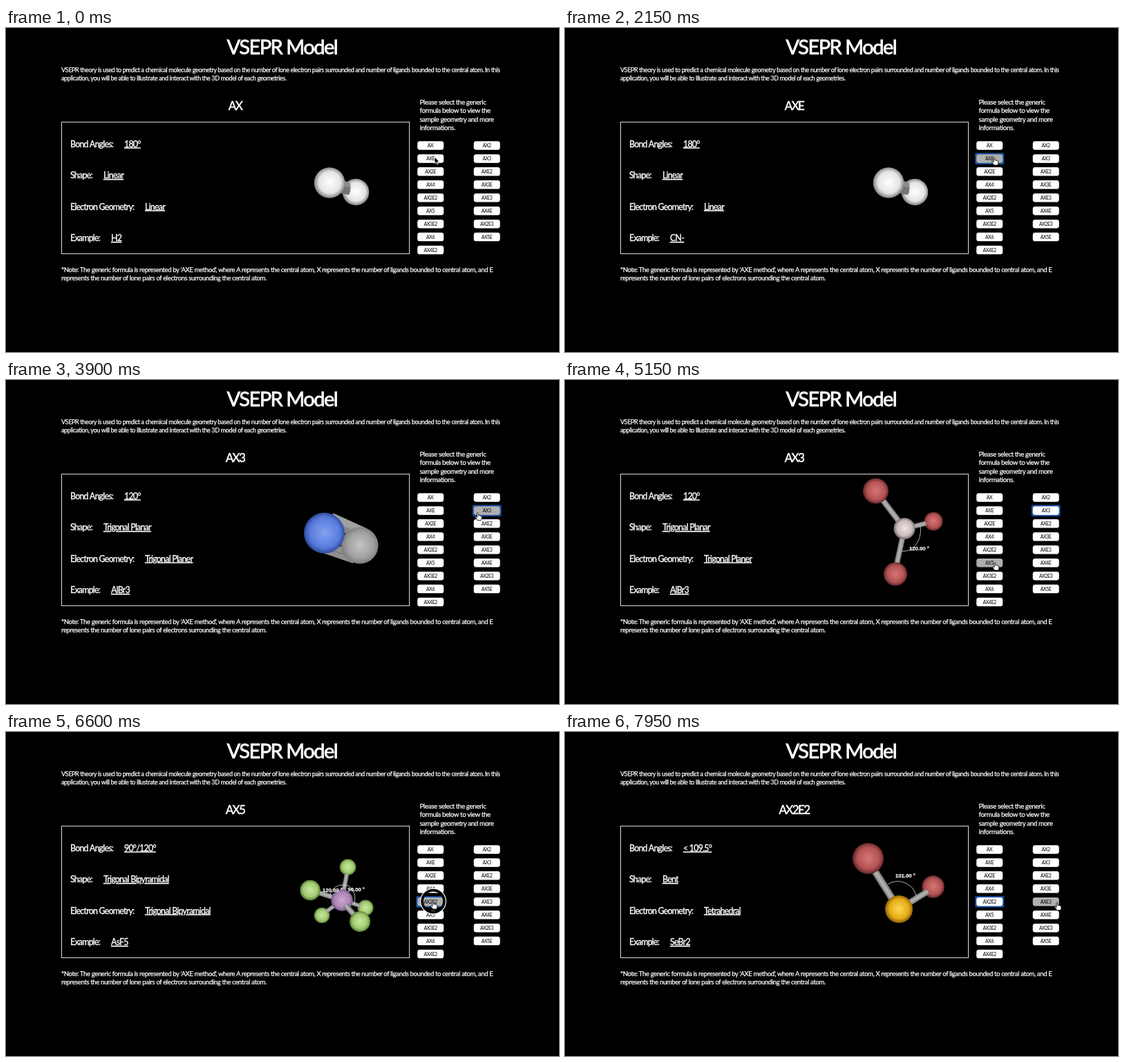
Recreate the animation shown at these times as an HTML page. Size 800 by 470 pixels, loop 8000 ms.

```html
<!DOCTYPE html>
<html lang="en">
<head>
<meta charset="utf-8">
<title>VSEPR Model</title>
<style>
html, body { margin: 0; width: 100%; height: 100%; overflow: hidden; background: #000; }
svg { display: block; width: 800px; height: 470px; background: #000; }
text { font-family: Lato, "Open Sans", sans-serif; fill: #fff; stroke: #fff; stroke-width: .25px; white-space: pre; }
.title { font-size: 29px; letter-spacing: -1.5px; stroke-width: .8px; text-anchor: middle; }
.head { font-size: 17px; letter-spacing: -1.6px; stroke-width: .5px; text-anchor: middle; }
.intro { font-size: 9.1px; letter-spacing: -.045em; }
.note { font-size: 9.6px; letter-spacing: -.0417em; }
.side { font-size: 9.8px; letter-spacing: -.04em; }
.row { font-size: 12.4px; letter-spacing: -.75px; stroke-width: .35px; }
.value { text-decoration: underline; text-decoration-thickness: 1px; text-underline-offset: 1.5px; }
.btn { font-size: 7px; letter-spacing: -.45px; text-anchor: middle; fill: #000; stroke: none; }
.angle { font: bold 7.7px "Liberation Sans", sans-serif; }
</style>
</head>
<body>
<svg id="stage" viewBox="0 0 800 470"></svg>
<script>
const NS = "http://www.w3.org/2000/svg";
const LOOP = 8000;
const stage = document.getElementById("stage");

function el(tag, attrs = {}, parent = stage, text) {
  const node = document.createElementNS(NS, tag);
  for (const key in attrs) node.setAttribute(key, attrs[key]);
  if (text !== undefined) node.textContent = text;
  parent.appendChild(node);
  return node;
}
const write = (cls, x, y, text, parent) => el("text", { class: cls, x, y }, parent, text);
const show = (node, on) => node.setAttribute("visibility", on ? "visible" : "hidden");

// Sphere materials: centre, middle and rim colours
const materials = {
  white: ["#ffffff", "#e4e4e4", "#777777"],
  grey: ["#c4c4c4", "#a0a0a0", "#7c7c7c"],
  blue: ["#7d9df0", "#5378dc", "#2c479c"],
  red: ["#d67474", "#b25052", "#5c2426"],
  pale: ["#eee2e2", "#cabcbd", "#716566"],
  green: ["#c8e8a0", "#a0ca70", "#54752f"],
  violet: ["#d2b6dc", "#ab8fba", "#6a5478"],
  gold: ["#ffd850", "#e4aa16", "#835a08"]
};
const defs = el("defs");
for (const name in materials) {
  const grad = el("radialGradient", { id: name, cx: .51, cy: .49, r: .52 }, defs);
  materials[name].forEach((color, i) =>
    el("stop", { offset: [0, .68, 1][i], "stop-color": color }, grad));
}
function dots(id, size, color, radius) {
  const tile = el("pattern", {
    id, width: size, height: size, patternUnits: "userSpaceOnUse", patternTransform: "rotate(24)"
  }, defs);
  el("circle", { cx: size / 2, cy: size / 2, r: radius, fill: color }, tile);
}
dots("mesh", 2.4, "#fff", .5);
dots("pink", 3.2, "#f07ad8", .8);
dots("dark", 2.7, "#3a2848", .6);

function ball(g, x, y, r, material, pattern, opacity = .3) {
  el("circle", { cx: x, cy: y, r, fill: `url(#${material})` }, g);
  if (pattern) el("circle", { cx: x, cy: y, r: r * .87, fill: `url(#${pattern})`, opacity }, g);
}
function bond(g, x1, y1, x2, y2, w) {
  [["#757575", 1], ["#999", .7], ["#b0b0b0", .35]].forEach(([stroke, k]) =>
    el("line", { x1, y1, x2, y2, stroke, "stroke-width": w * k }, g));
}
const shape = (g, d, fill) => el("path", { d, fill }, g);
const arc = (g, d) => el("path", { d, fill: "none", stroke: "#ddd", "stroke-width": .8 }, g);

const builders = {
  AX(g) {
    ball(g, 506, 238, 19.3, "white");
    shape(g, "M486 220L498 225Q500 233 496 242L482 239Z", "#8c8c8c");
    shape(g, "M488 229L498 232Q498 238 496 242L482 239Z", "#747474");
    ball(g, 468, 224.5, 22.3, "white");
  },
  AXE(g) {
    shape(g, "M473 193L521 215L502 266L453 249Z", "#888");
    shape(g, "M475 194L523 216L516 224L478 207Z", "#a0a0a0");
    shape(g, "M484 220L499 224L492 242L478 244Z", "#3c3c3c");
    shape(g, "M486 227L505 228L496 240L480 238Z", "#858585");
    shape(g, "M464 245L494 240L504 265L456 250Z", "#8e8e8e");
    arc(g, "M472 247L497 256").setAttribute("stroke", "#666");
    ball(g, 512, 240, 26.5, "grey");
    ball(g, 460.5, 222, 29.5, "blue", "mesh", .35);
  },
  AX3(g) {
    ball(g, 533, 205, 13.5, "red", "mesh", .12);
    bond(g, 491, 215.5, 522, 208, 7);
    bond(g, 491, 215.5, 480, 267, 8);
    bond(g, 491, 215.5, 458, 172, 8.5);
    ball(g, 491, 215.5, 15.5, "pale");
    ball(g, 478, 281.5, 17, "red", "mesh", .12);
    ball(g, 449.5, 161, 18.5, "red", "mesh", .12);
    arc(g, "M487 248C502 251 517 234 514 212");
    write("angle", 498, 247, "120.00 °", g);
  },
  AX5(g) {
    ball(g, 494.5, 196, 11.8, "green");
    ball(g, 520, 255, 11.5, "green");
    ball(g, 457, 266, 11.3, "green");
    bond(g, 486, 244, 493, 206, 6.5);
    bond(g, 486, 244, 512, 252, 6);
    bond(g, 486, 244, 464, 260, 6);
    bond(g, 486, 244, 452, 233, 7.5);
    ball(g, 486, 244, 15.7, "violet", "pink", .75);
    el("circle", { cx: 486, cy: 244, r: 14.5, fill: "url(#dark)", opacity: .4 }, g);
    bond(g, 491, 251, 506, 268, 8);
    ball(g, 440, 229.5, 14.7, "green");
    ball(g, 512, 275, 15, "green");
    arc(g, "M468 238C471 226 480 221 490 222M490 222C500 222 507 234 504 249");
    write("angle", 458, 232, "120.00 °", g);
    write("angle", 494.5, 230.5, "90.00 °", g);
  },
  AX2E2(g) {
    ball(g, 532.5, 224.5, 16.3, "red", "mesh", .12);
    bond(g, 483, 257, 525, 231, 9);
    bond(g, 483, 257, 449, 203, 10.5);
    ball(g, 483, 257, 20, "gold", "mesh", .08);
    ball(g, 438.5, 183.5, 22.5, "red", "mesh", .12);
    arc(g, "M467 221C482 211 504 219 508 238");
    write("angle", 478, 211, "101.00 °", g);
  }
};

// Fixed page text
write("title", 399.3, 38, "VSEPR Model");
write("intro", 80, 64, "VSEPR theory is used to predict a chemical molecule geometry based on the number of lone electron pairs surrounded and number of ligands bounded to the central atom. In this");
write("intro", 80, 76, "application, you will be able to illustrate and interact with the 3D model of each geometries.");
write("note", 80, 353.5, "*Note: The generic formula is represented by 'AXE method', where A represents the central atom, X represents the number of ligands bounded to central atom, and E");
write("note", 80, 366, "represents the number of lone pairs of electrons surrounding the central atom.");
["Please select the generic", "formula below to view the", "sample geometry and more", "informations."]
  .forEach((line, i) => write("side", 598.5, 110.5 + i * 12.6, line));
el("rect", { x: 80.5, y: 136.5, width: 503, height: 191, fill: "none", stroke: "#dcdcdc" });

const rowY = i => 172.5 + i * 45.5;
["Bond Angles:", "Shape:", "Electron Geometry:", "Example:"]
  .forEach((label, i) => write("row", 93, rowY(i), label));
const heading = write("head", 331.5, 119, "");
const values = [171, 141, 201, 152].map((x, i) => write("row value", x, rowY(i), ""));

const info = {
  AX: ["180°", "Linear", "Linear", "H2"],
  AXE: ["180°", "Linear", "Linear", "CN-"],
  AX3: ["120°", "Trigonal Planar", "Trigonal Planer", "AlBr3"],
  AX5: ["90°/120°", "Trigonal Bipyramidal", "Trigonal Bipyramidal", "AsF5"],
  AX2E2: ["< 109.5°", "Bent", "Tetrahedral", "SeBr2"]
};

const models = {};
for (const name in builders) {
  models[name] = el("g");
  builders[name](models[name]);
}

// Formula buttons
const buttons = [];
function addColumn(x, names) {
  names.forEach((name, i) => {
    const y = 164.2 + i * 18.95;
    const ring = el("rect", { x: x - 2, y: y - 2, width: 42, height: 16.5, rx: 1.8, fill: "#184f9e" });
    const face = el("rect", { x, y, width: 38, height: 12.5, rx: 3.4, fill: "#fff" });
    write("btn", x + 18.8, y + 8.8, name);
    buttons.push({ name, x, y, ring, face });
  });
}
addColumn(595.2, ["AX", "AXE", "AX2E", "AX4", "AX2E2", "AX5", "AX3E2", "AX6", "AX4E2"]);
addColumn(676.7, ["AX2", "AX3", "AXE2", "AX3E", "AXE3", "AX4E", "AX2E3", "AX5E"]);

// Click ripple and pointer
const ripple = el("g", { fill: "none" });
const rippleRings = [["#000", 4, -2], ["#e8e8e8", 1.3, .4]].map(([stroke, w, grow]) =>
  ({ grow, node: el("circle", { stroke, "stroke-width": w }, ripple) }));
const pointer = el("g");
const arrow = el("path", {
  d: "M0 0V9.6L2.2 7.6L3.7 11L5.3 10.3L3.8 7H6.8Z",
  fill: "#000", stroke: "#fff", "stroke-width": .75
}, pointer);
const hand = el("path", {
  d: "M0 .8C0-.4 1.8-.4 1.8 .8V4.2C2.2 3.5 3.4 3.6 3.6 4.4C4.2 3.8 5.2 4 5.3 4.9C6 4.5 6.8 4.8 6.8 5.7V8Q6.6 9.5 5.8 11H.5C-.2 9.3-1.6 8-2.6 6.6C-3 5.7-2 5.2-1.3 5.8L0 7Z",
  fill: "#fff", stroke: "#000", "stroke-width": .8
}, pointer);

// Each selection: press time and time its model appears
const picks = [
  { name: "AX", press: -1000, load: -500 },
  { name: "AXE", press: 1750, load: 2500 },
  { name: "AX3", press: 3600, load: 4500 },
  { name: "AX5", press: 5450, load: 6250 },
  { name: "AX2E2", press: 6550, load: 7350 }
];
const route = [
  [0, 620, 187], [2520, 620, 188], [2900, 674, 198], [3280, 681.5, 192.5],
  [4350, 681.5, 192.5], [5050, 621, 265], [5650, 621, 265], [6300, 617, 246],
  [6850, 617, 246], [7450, 711, 247.5], [LOOP, 711, 247.5]
];
function position(t) {
  let i = 0;
  while (i < route.length - 2 && t >= route[i + 1][0]) i++;
  const [t0, x0, y0] = route[i], [t1, x1, y1] = route[i + 1];
  const u = (t - t0) / (t1 - t0), k = u * u * (3 - 2 * u);
  return [x0 + (x1 - x0) * k, y0 + (y1 - y0) * k];
}
const latest = test => picks.filter(test).pop();

function draw(t) {
  const pressed = latest(p => t >= p.press);
  const named = latest(p => t >= p.press + 100).name;
  const loaded = latest(p => t >= p.load).name;

  heading.textContent = named;
  values.forEach((node, i) => { node.textContent = info[named][i]; });
  for (const name in models) show(models[name], name === loaded);

  const [x, y] = position(t);
  let over = false;
  for (const b of buttons) {
    const hover = t >= 100 && x >= b.x && x <= b.x + 38 && y >= b.y && y <= b.y + 12.5;
    over = over || hover;
    b.face.setAttribute("fill", hover ? "#afafaf" : "#fff");
    show(b.ring, pressed.press > 0 && b.name === pressed.name);
  }

  const age = t - pressed.press;
  show(ripple, age < 200);
  if (age < 200) {
    for (const { node, grow } of rippleRings) {
      node.setAttribute("cx", x + 1);
      node.setAttribute("cy", y - .5);
      node.setAttribute("r", 17 + age / 50 + grow);
    }
    ripple.setAttribute("opacity", Math.min(1, (200 - age) / 100));
  }
  pointer.setAttribute("transform", `translate(${x} ${y})`);
  show(arrow, !over);
  show(hand, over);
}

const start = performance.now();
function tick() {
  draw((performance.now() - start) % LOOP);
  requestAnimationFrame(tick);
}
tick();
</script>
</body>
</html>
```
